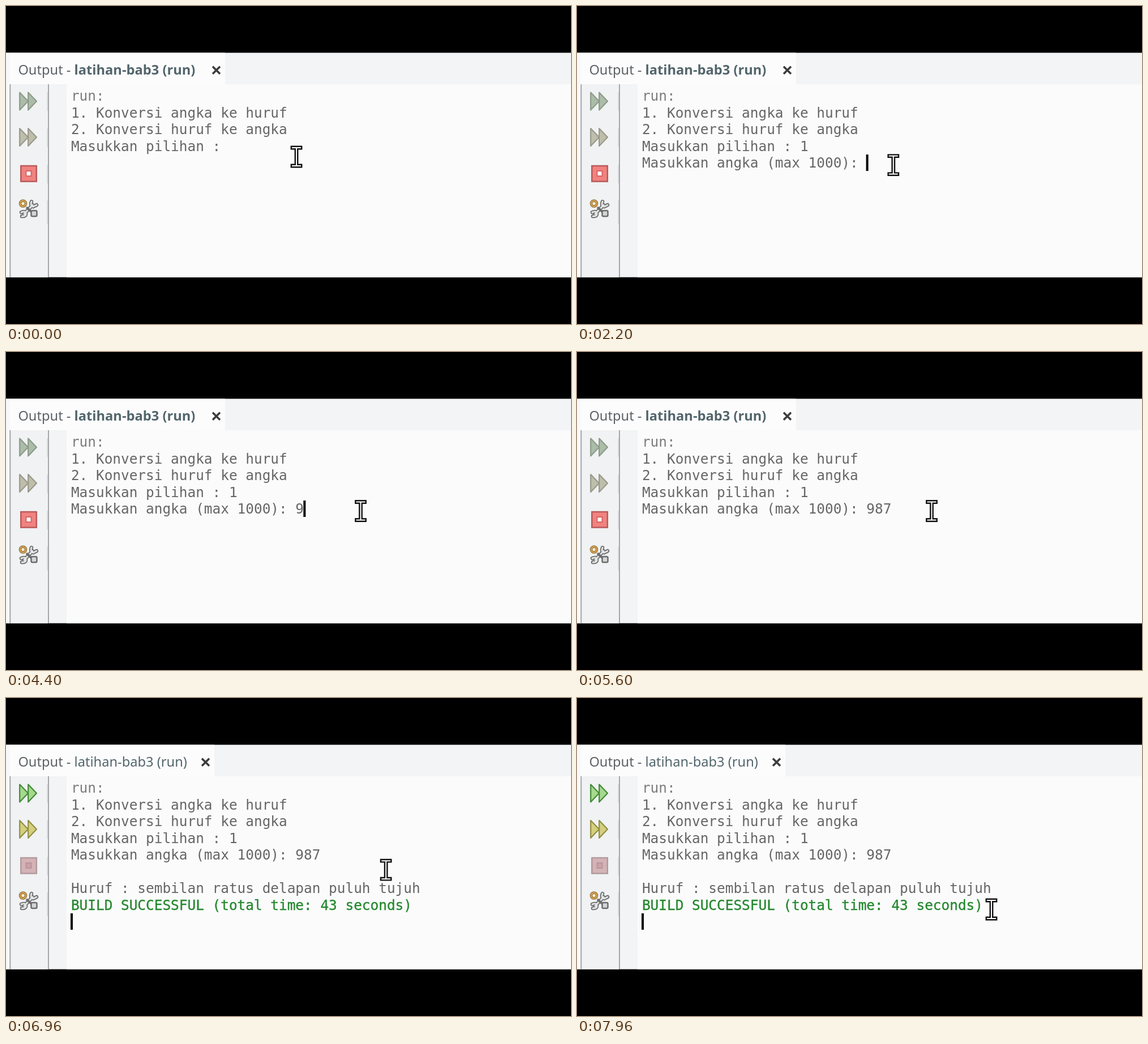
Animation of 998 by 561 pixels, one loop 8000 ms. Source, as an HTML page:

```html
<!DOCTYPE html>
<html lang="id">
<head>
<meta charset="utf-8">
<title>Output</title>
<style>
  html, body { margin: 0; width: 100%; height: 100%; overflow: hidden; background: #000; }
  svg { display: block; width: 998px; height: 561px; }
  text { white-space: pre; }
  .title { font: 23.65px "Noto Sans", "Open Sans", sans-serif; fill: #5c6164; }
  .title .name { fill: #52656b; }
  .running .title .name { font-weight: bold; }
  .console { font: 24.4px "DejaVu Sans Mono", monospace; fill: #666; }
  .run { fill: #abbca8; stroke: #8d9c8a; }
  .rerun { fill: #bfbeaa; stroke: #9a998c; }
  .stop { fill: #d4b3b7; stroke: #b3999d; }
  .stop-hole { fill: #c9a3a7; stroke: #b9949a; }
  .done .run { fill: #a6d98c; stroke: #438a3a; }
  .done .rerun { fill: #d3cf7c; stroke: #938f45; }
  .running .stop { fill: #f08380; stroke: #b95a5a; }
  .running .stop-hole { fill: #fff; stroke: #d76462; }
</style>
</head>
<body>
<svg id="stage" class="running" viewBox="0 0 998 561">
  <defs>
    <path id="arrows" d="M24.2 1.5L39 17L24.2 32.5ZM39.2 1.5L54 17L39.2 32.5Z" stroke-width="2.2" stroke-linejoin="round"/>
    <path id="beam" d="M-7 -16H7M0 -16V16M-7 16H7" fill="none" stroke-linecap="square"/>
    <path id="wrench" d="M32 367L47 351M45 345Q42 352 48 354L54 351M27 364Q34 361 35 366Q36 371 28 371" fill="none" stroke-linecap="round"/>
  </defs>

  <rect y="82.5" width="998" height="396" fill="#f2f4f5"/>
  <rect y="82.5" width="7" height="396" fill="#f8f8fa"/>
  <rect id="tab" x="7" y="82.5" height="55.5" fill="#fcfcfd"/>
  <rect x="107" y="138" width="891" height="340.5" fill="#fbfbfc"/>
  <rect x="8" y="138" width="66" height="340.5" fill="#f0f2f3"/>
  <path d="M7.3 138V478M75 138V478" stroke="#a4a6a8" stroke-width="2"/>
  <path d="M73 152V185M73 216V249M73 280V313M73 343V385" stroke="#d8d9da" stroke-width="1.5"/>

  <text class="title" x="21.4" y="121">Output - <tspan class="name">latihan-bab3 (run)</tspan></text>
  <path id="close" d="M-6.5 -6.5L6.5 6.5M6.5 -6.5L-6.5 6.5" stroke="#3c3c3c" stroke-width="3.6"/>

  <use class="run" href="#arrows" y="151"/>
  <use class="rerun" href="#arrows" y="214.5"/>
  <rect class="stop" x="26.3" y="282" width="27.5" height="27.5" stroke-width="2.5"/>
  <rect class="stop-hole" x="35.5" y="291" width="9" height="9" stroke-width="2"/>

  <use href="#wrench" stroke="#6c6c6c" stroke-width="6.5"/>
  <use href="#wrench" stroke="#e4e6e6" stroke-width="3"/>
  <path d="M36 355L48 366" stroke="#6c6c6c" stroke-width="4"/>
  <rect x="44.5" y="361" width="10" height="10" rx="2" fill="#d4d6d6" stroke="#6c6c6c" stroke-width="2.5"/>
  <circle cx="30" cy="348.5" r="5" fill="#fbeecb" stroke="#856a3c" stroke-width="4.5"/>
  <circle cx="30" cy="348.5" r="5" fill="none" stroke="#d9a24e" stroke-width="2.5"/>

  <g id="console" class="console"></g>
  <rect id="caret" width="4" height="29"/>
  <g id="pointer">
    <use href="#beam" stroke="#111" stroke-width="6.8"/>
    <use href="#beam" stroke="#fff" stroke-width="2"/>
  </g>
</svg>
<script>
const LOOP = 8000, BLINK = 500, COLUMN = 14.69, LINE = 29.45;
const CHOSEN = 500, PROMPTED = 960, DONE = 5760;
const digits = [[4280, "9"], [4560, "8"], [4800, "7"]];
const edits = [-600, CHOSEN, PROMPTED, ...digits.map(d => d[0]), DONE];

// time, x, y
const pointerPath = [
  [0, 513, 266], [1700, 513, 267], [2400, 577, 286], [2800, 589, 294], [2950, 589, 294],
  [3250, 630, 284], [3400, 626.5, 280.5], [6720, 626.5, 280.5], [6960, 671, 303],
  [7400, 732, 373], [LOOP, 732, 373]
];

const $ = id => document.getElementById(id);
const stage = $("stage");
const rows = Array.from({ length: 8 }, (_, i) => {
  const row = document.createElementNS("http://www.w3.org/2000/svg", "text");
  row.setAttribute("x", 114.9);
  row.setAttribute("y", 167.4 + i * LINE);
  $("console").append(row);
  return row;
});
rows[0].style.fill = "#7c7c7c";
rows[7].style.cssText = "fill: #26882f; stroke: #26882f; stroke-width: .4px";

function consoleLines(t) {
  const lines = ["run:", "1. Konversi angka ke huruf", "2. Konversi huruf ke angka",
    "Masukkan pilihan : " + (t >= CHOSEN ? "1" : "")];
  if (t >= PROMPTED) {
    const typed = digits.filter(d => t >= d[0]).map(d => d[1]).join("");
    lines.push("Masukkan angka (max 1000): " + typed);
  }
  if (t >= DONE) {
    lines.push("", "Huruf : sembilan ratus delapan puluh tujuh",
      "BUILD SUCCESSFUL (total time: 43 seconds)", "");
  }
  return lines;
}

function pointerAt(t) {
  const next = pointerPath.findIndex(p => p[0] > t);
  const [t0, x0, y0] = pointerPath[next - 1], [t1, x1, y1] = pointerPath[next];
  const k = (t - t0) / (t1 - t0);
  return [x0 + (x1 - x0) * k, y0 + (y1 - y0) * k];
}

function draw(t) {
  const done = t >= DONE;
  stage.setAttribute("class", done ? "done" : "running");
  $("tab").setAttribute("width", done ? 361 : 380);
  $("close").setAttribute("transform", `translate(${done ? 352.5 : 371.5} 113.3)`);

  const lines = consoleLines(t);
  rows.forEach((row, i) => { row.textContent = lines[i] || ""; });

  const last = lines.length - 1;
  const lastEdit = Math.max(...edits.filter(e => e <= t));
  $("caret").setAttribute("x", 114 + lines[last].length * COLUMN);
  $("caret").setAttribute("y", 262 + (last - 4) * LINE);
  $("caret").style.opacity = (t - lastEdit) % (2 * BLINK) < BLINK ? 1 : 0;
  $("pointer").setAttribute("transform", `translate(${pointerAt(t)})`);
}

function tick() {
  draw(performance.now() % LOOP);
  requestAnimationFrame(tick);
}
tick();
</script>
</body>
</html>
```
